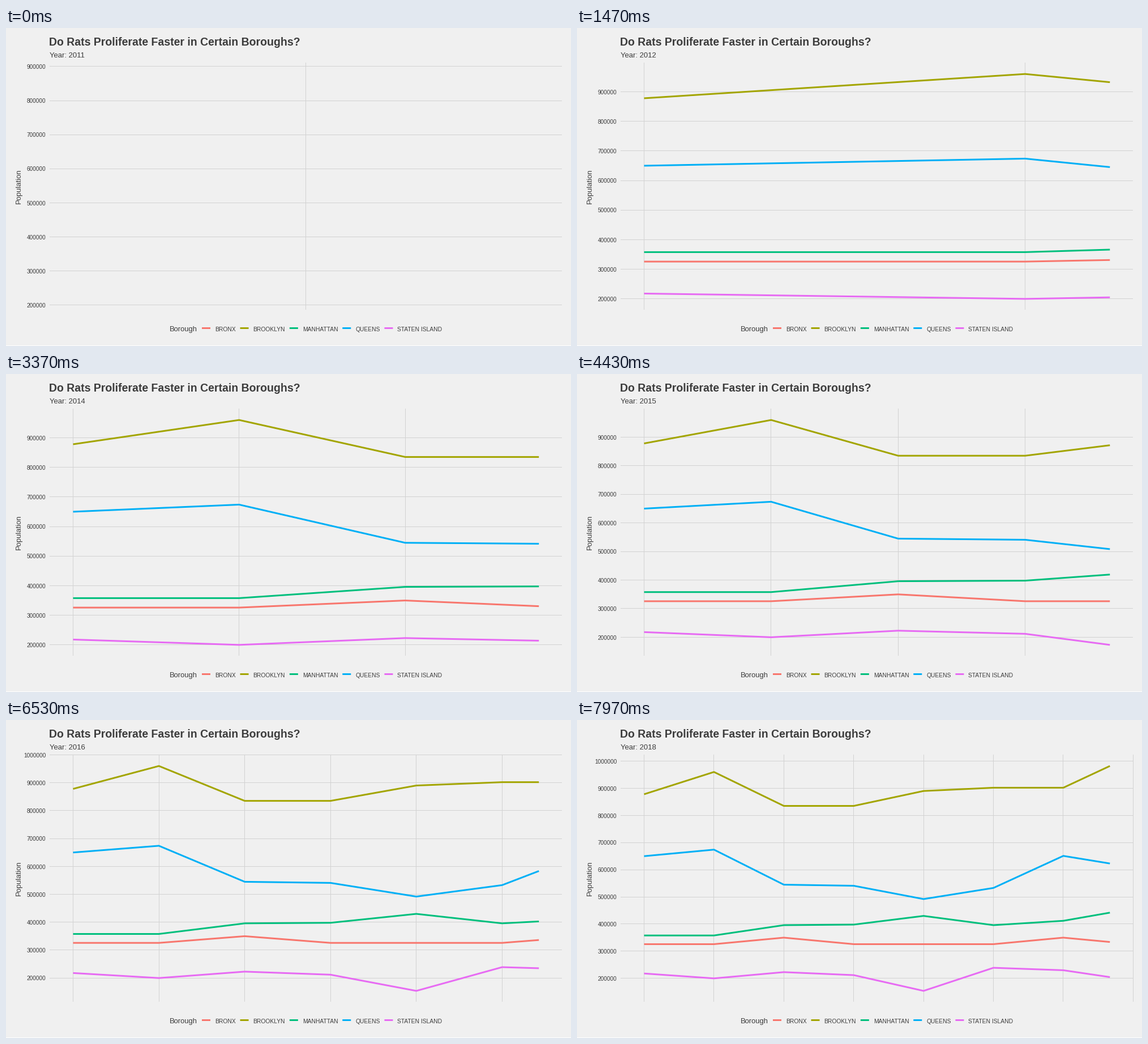
These frames come from a looping animation (998 by 561 pixels, 8 s). A matplotlib script:

```python
import math

import matplotlib.pyplot as plt
import numpy as np
from matplotlib.animation import FuncAnimation
from matplotlib.collections import LineCollection
from matplotlib.patches import Rectangle

W, H, DPI = 998, 561, 64
FRAMES, LOOP_MS = 240, 8000
PX = 72 / DPI  # points per pixel

INK, PAPER, GRID = "#3C3C3C", "#F0F0F0", "#D2D2D2"
LEFT, RIGHT, TOP, BOTTOM = 76.9, 981.9, 60.8, 497.2
PAD = 0.05  # share of the data range added on each side

FRAMES_PER_YEAR = 35.9
YEARS = np.arange(8)
KEYS = np.round(FRAMES_PER_YEAR * YEARS)
LEVELS = range(100, 1101, 100)

COLOURS = {"BRONX": "#F8766D", "BROOKLYN": "#A3A500", "MANHATTAN": "#00BF7D",
           "QUEENS": "#00B0F6", "STATEN ISLAND": "#E76BF3"}

# Turning points in thousands, one per year
SERIES = [
    326 + 24 * (YEARS % 4 == 2),  # level, with a bump every fourth year
    [878, 960, 835, 835, 890, 902, 902, 1022],
    [358, 358, 396, 398, 430, 396, 412, 457],
    [650, 674, 545, 541, 492, 533, 651, 609],
    [218, 200, 223, 212, 154, 239, 230, 192],
]

plt.rcParams["font.family"] = "Liberation Sans"
fig = plt.figure(figsize=(W / DPI, H / DPI), dpi=DPI, facecolor="white")
ax = fig.add_axes([0, 0, 1, 1])
ax.set_xlim(0, W)
ax.set_ylim(H, 0)
ax.axis("off")
ax.add_patch(Rectangle((0, 0), W, H - 1, color=PAPER, lw=0))


def label(x, y, text, px, **style):
    return ax.text(x, y, text, fontsize=px * PX, color=INK,
                   va="baseline", **style)


def stroke(xs, ys, colour):
    return ax.plot(xs, ys, color=colour, lw=3 * PX, snap=False, zorder=3,
                   solid_capstyle="butt", solid_joinstyle="round")[0]


def crisp(v):
    """Centre of the pixel nearest to v."""
    return math.floor(v + 0.5) + 0.5


def scale(low, high, start, end):
    """Map low..high into start..end, leaving padding at both ends."""
    pad = PAD * (end - start) / (1 + 2 * PAD)
    if high == low:
        return lambda v: (start + end) / 2 + 0 * v
    return lambda v: start + pad + (v - low) / (high - low) * (end - start - 2 * pad)


def visible(ticks, low, high):
    pad = PAD * (high - low) + 1e-9
    return [t for t in ticks if low - pad <= t <= high + pad]


def draw_legend(x):
    label(x - 57.5, 535, "Borough", 13)
    for name, colour in COLOURS.items():
        stroke([x, x + 15], [529.5, 529.5], colour)
        text = label(x + 22.8, 535, name, 10.3)
        x += 22.8 + text.get_window_extent().width + 8


label(76.2, 31, "Do Rats Proliferate Faster in Certain Boroughs?", 19.5,
      weight="bold")
subtitle = label(76.6, 52, "", 13.1)
label(25.5, 279, "Population", 13, rotation=90, ha="center",
      rotation_mode="anchor")
draw_legend(346)

grid = LineCollection([], colors=GRID, linewidths=PX, snap=False, zorder=2)
ax.add_collection(grid, autolim=False)
ticks = {v: label(70.6, 0, f"{v}000", 10, ha="right") for v in LEVELS}
lines = [stroke([], [], colour) for colour in COLOURS.values()]


def draw(frame):
    now = np.interp(frame, KEYS, YEARS)
    times = np.append(YEARS[YEARS < now], now)
    rows = [np.interp(times, YEARS, values) for values in SERIES]
    low, high = np.min(rows), np.max(rows)
    to_x = scale(0, now, LEFT, RIGHT)
    to_y = scale(low, high, BOTTOM, TOP)

    shown = visible(LEVELS, low, high)
    segments = []
    for v, tick in ticks.items():
        tick.set_visible(v in shown)
        tick.set_y(to_y(v) + 4.7)
    for v in shown:
        y = crisp(to_y(v))
        segments.append([(77, y), (982, y)])
    for year in visible(YEARS, 0, now):
        x = crisp(to_x(year))
        segments.append([(x, 61), (x, 497)])
    grid.set_segments(segments)

    for line, row in zip(lines, rows):
        line.set_data(to_x(times) + 0.5, to_y(row) + 0.5)
        line.set_visible(now > 0)
    year = 2011 + math.floor(frame / FRAMES_PER_YEAR + 0.5)
    subtitle.set_text(f"Year: {year}")
    return [grid, subtitle, *lines, *ticks.values()]


anim = FuncAnimation(fig, draw, frames=FRAMES, interval=LOOP_MS / FRAMES,
                     init_func=lambda: draw(0), repeat=True, repeat_delay=0,
                     blit=False)
plt.show()
```
